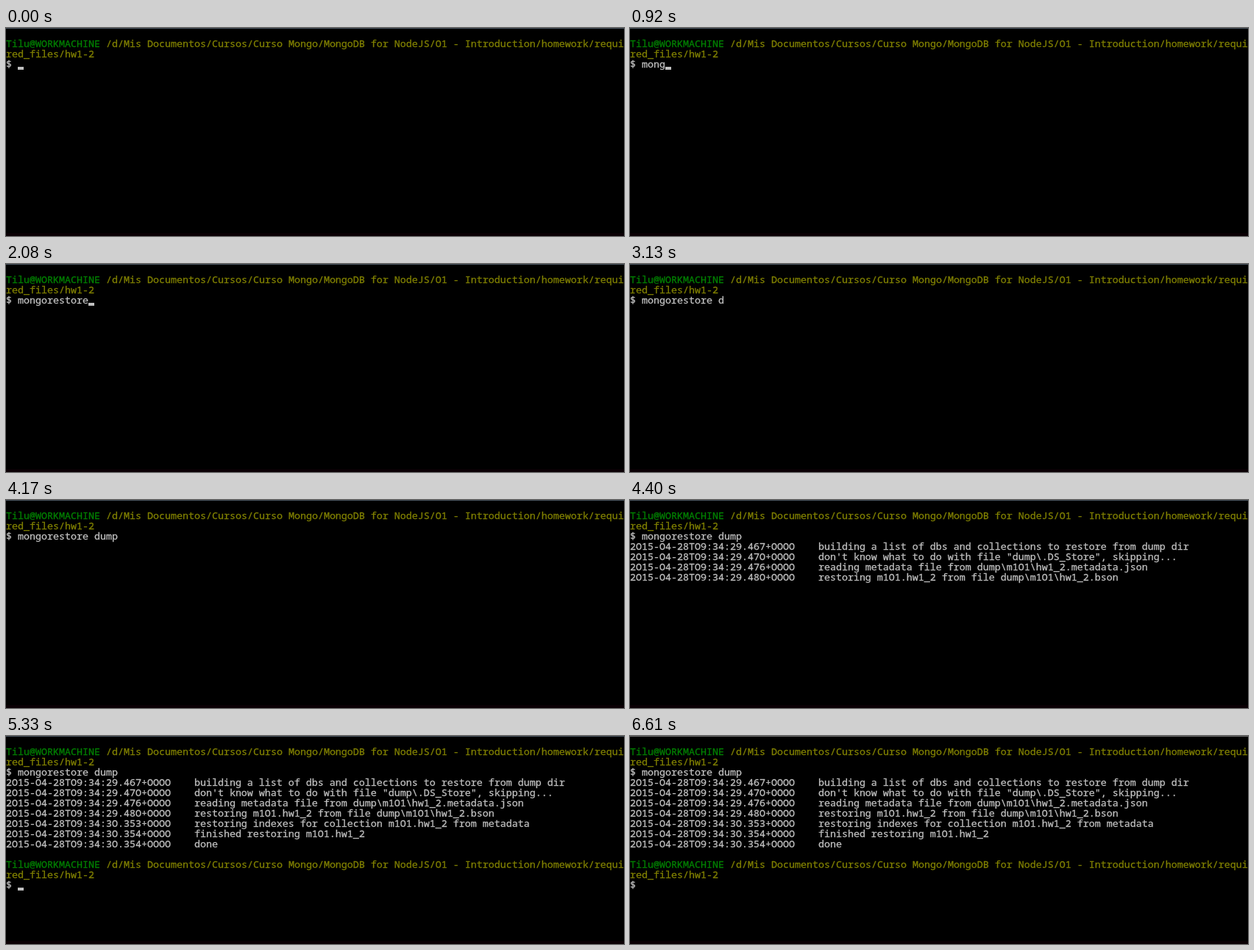
An HTML page with a canvas for the animation above (6710 ms loop, 840 by 284 pixels).

```html
<!DOCTYPE html>
<html lang="en">
<head>
<meta charset="utf-8">
<title>Terminal</title>
<style>
  html, body { margin: 0; width: 100%; height: 100%; overflow: hidden; background: #000; }
  canvas { display: block; }
</style>
</head>
<body>
<canvas id="stage" width="840" height="284"></canvas>
<script>
const ctx = document.getElementById('stage').getContext('2d', { alpha: false });
const LOOP = 6710, KEY_GAP = 116, CELL = 8, ROW = 14, COLS = 105;
const GREEN = '#008000', OLIVE = '#808000', SILVER = '#c0c0c0';

const USER = 'Tilu@WORKMACHINE';
const PATH = ' /d/Mis Documentos/Cursos/Curso Mongo/MongoDB for NodeJS/01 - Introduction/homework/required_files/hw1-2';
const SPLIT = COLS - USER.length;
const LOG = [
  '29.467    building a list of dbs and collections to restore from dump dir',
  '29.470    don\'t know what to do with file "dump\\.DS_Store", skipping...',
  '29.476    reading metadata file from dump\\m101\\hw1_2.metadata.json',
  '29.480    restoring m101.hw1_2 from file dump\\m101\\hw1_2.bson',
  '30.353    restoring indexes for collection m101.hw1_2 from metadata',
  '30.354    finished restoring m101.hw1_2',
  '30.354    done'
].map(line => '2015-04-28T09:34:' + line.replace(' ', '+0000 '));

// Bursts of typing; keys within a burst follow at an even pace
const BURSTS = { m: 480, o: 480, n: 710, go: 920, res: 1270, tore: 1730, ' ': 2430, d: 3130, u: 3380, mp: 3590 };
// The cursor starts visible and flips at each of these times
const BLINKS = [480, 710, 1030, 1270, 2550, 3380, 4170, 5330, 5790, 6250, 6610];
const ENTER = 4050, FIRST_OUTPUT = 4400, LAST_OUTPUT = 5230, NEW_PROMPT = 5330, FADE = 6610;

const rowTop = row => row * ROW + 1;

function typedText(t) {
  return Object.entries(BURSTS).map(([keys, start]) =>
    keys.slice(0, Math.max(0, Math.floor((t - start) / KEY_GAP) + 1))
  ).join('');
}

function write(text, col, row, color) {
  const plain = text.replaceAll('0', 'O'); // zero without a slash
  const x = col * CELL, y = rowTop(row) + 11;
  ctx.fillStyle = ctx.strokeStyle = color;
  ctx.fillText(plain, x, y);
  ctx.strokeText(plain, x, y);
}

function prompt(row) {
  write(USER, 0, row, GREEN);
  write(PATH.slice(0, SPLIT), USER.length, row, OLIVE);
  write(PATH.slice(SPLIT), 0, row + 1, OLIVE);
  write('$', 0, row + 2, SILVER);
}

function drawCursor(t, typed) {
  if (BLINKS.filter(time => t >= time).length % 2) return;
  const [col, row] = t >= NEW_PROMPT ? [2, 14] : t >= ENTER ? [0, 4] : [2 + typed.length, 3];
  ctx.fillStyle = SILVER;
  ctx.fillRect(col * CELL, rowTop(row) + 10, CELL, 4);
}

function draw(t) {
  ctx.fillStyle = '#000';
  ctx.fillRect(0, 0, 840, 284);
  ctx.fillStyle = t < FADE ? '#46525c' : '#666';
  ctx.fillRect(0, 0, 840, 1);
  ctx.fillStyle = '#0a0004';
  ctx.fillRect(0, 280, 840, 4);

  ctx.font = '13.333px "Noto Sans Mono", "DejaVu Sans Mono", monospace';
  ctx.lineWidth = 0.3;

  const typed = typedText(t);
  prompt(1);
  write(typed, 2, 3, SILVER);

  const shown = t < FIRST_OUTPUT ? 0 : t < LAST_OUTPUT ? 4 : LOG.length;
  LOG.slice(0, shown).forEach((line, i) => write(line, 0, 4 + i, SILVER));

  if (t >= NEW_PROMPT) prompt(12);
  drawCursor(t, typed);
}

const begin = performance.now();
function tick() {
  draw((performance.now() - begin) % LOOP);
  requestAnimationFrame(tick);
}
tick();
</script>
</body>
</html>
```
